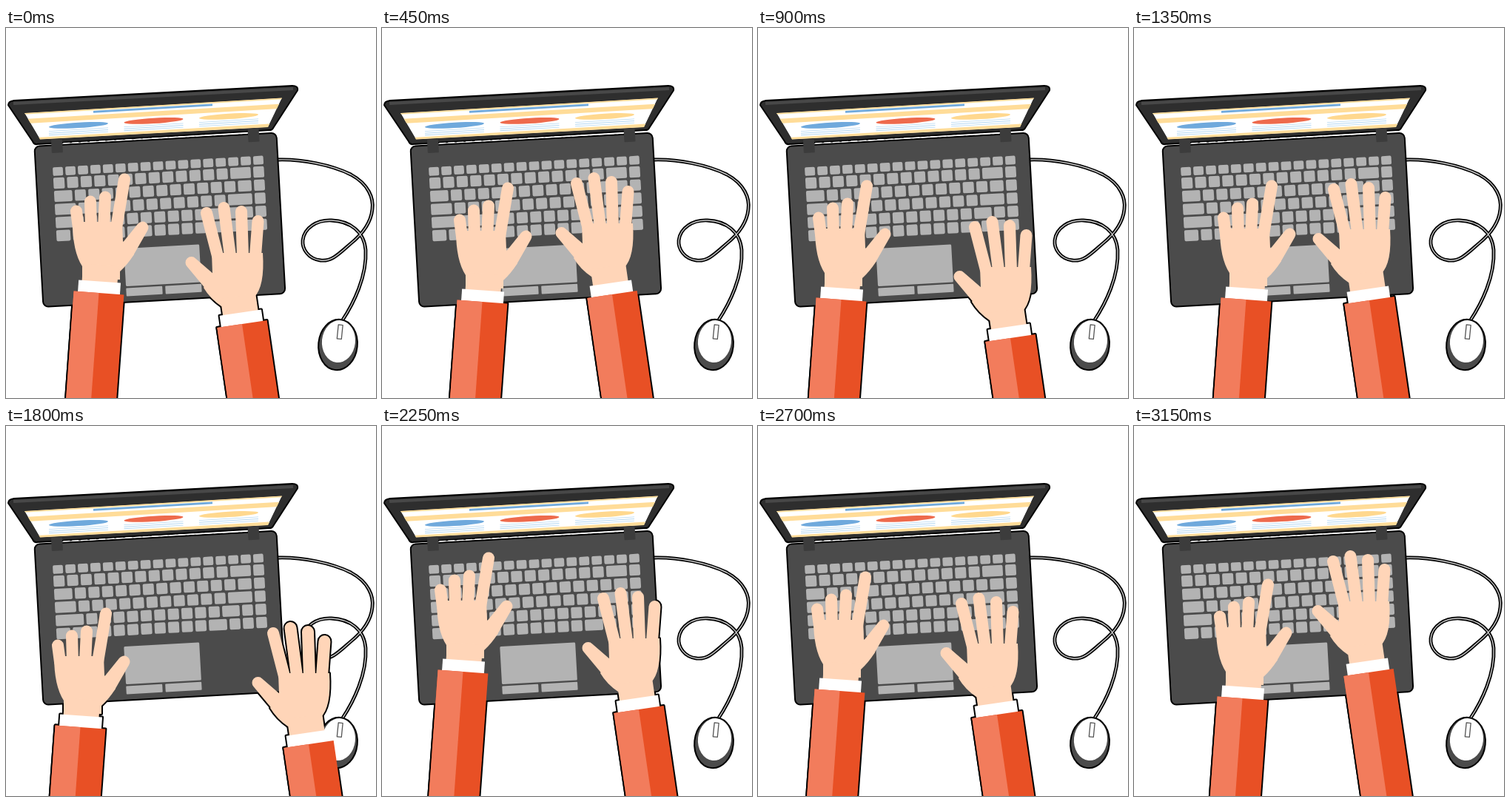
Write an HTML page with a canvas that moves like this. It is 500 by 500 pixels and loops after 3600 ms.

```html
<!DOCTYPE html>
<html lang="en">
<head>
<meta charset="utf-8">
<title>Typing hands</title>
<style>
html, body { margin: 0; width: 100%; height: 100%; overflow: hidden; background: #fff; }
canvas { display: block; width: 500px; height: 500px; }
</style>
</head>
<body>
<canvas id="stage"></canvas>
<script>
const STEP = 450, OUTLINE = 4;
const SKIN = '#ffd5b8', LIGHT = '#f27c5c', RED = '#e85025', DARK = '#4b4b4b', KEY = '#b3b3b3';

const canvas = document.getElementById('stage');
const ctx = canvas.getContext('2d');
const ratio = window.devicePixelRatio || 1;
canvas.width = canvas.height = 500 * ratio;

function fill(path, color) {
  ctx.fillStyle = color;
  ctx.fill(path);
}

function stroke(path, color = '#000', width = OUTLINE) {
  ctx.strokeStyle = color;
  ctx.lineWidth = width;
  ctx.stroke(path);
}

function outlined(path, color) {
  stroke(path);
  fill(path, color);
}

function box(x, y, w, h, r = 0) {
  const path = new Path2D();
  path.roundRect(x, y, w, h, r);
  return path;
}

function oval(x, y, rx, ry, turn = 0) {
  const path = new Path2D();
  path.ellipse(x, y, rx, ry, turn, 0, 7);
  return path;
}

function at(x, y, turn, paint) {
  ctx.save();
  ctx.translate(x, y);
  ctx.rotate(turn);
  paint();
  ctx.restore();
}

// Tapered finger from its tip to its base
function finger([x1, y1], [x2, y2], baseRadius = 8) {
  const path = new Path2D(), a = Math.atan2(y2 - y1, x2 - x1), q = Math.PI / 2;
  path.arc(x1, y1, 8, a + q, a + 3 * q);
  path.arc(x2, y2, baseRadius, a - q, a + q);
  path.closePath();
  return path;
}

// Each hand: fingertips from left to right, first knuckle, thumb, palm, sleeve and its path of moves
const HANDS = [
  {
    tips: [[95, 247.5], [114, 234.5], [134, 228.5], [160, 204.5]],
    knuckle: [98, 270],
    thumb: [[184.5, 269.5], [163, 301]],
    palm: 'M90 262H157L158 288L173 306Q164 320 154 329V340H103V322Q90 302 90 262Z',
    sleeve: [125.5, 358, .072],
    moves: [[0, 0], [10, 12], [-13, 9], [26, 9], [-25, 49], [-16, -26], [-15, 0], [21, 10]]
  },
  {
    tips: [[271, 250], [294.5, 243], [318, 248], [340.5, 261]],
    knuckle: [286, 308],
    thumb: [[250.5, 317], [277, 344]],
    palm: 'M278 304H347Q350 350 335 364V376H291Q276 366 267 351L279 332Z',
    sleeve: [319, 400, -.145],
    moves: [[0, 0], [-8, -40], [22, 19], [-1, -32], [90, 30], [28, -17], [4, -10], [-2, -67]]
  }
];

for (const hand of HANDS) {
  const [x, y] = hand.knuckle;
  hand.skin = [
    ...hand.tips.map((tip, i) => finger(tip, [x + 17 * i, y])),
    finger(...hand.thumb, 11),
    new Path2D(hand.palm)
  ];
}

function drawArm(hand, step, paint) {
  at(...hand.moves[step], 0, () => {
    hand.skin.forEach(path => paint(path, SKIN));
    at(...hand.sleeve, () => {
      paint(box(-24, -38, 48, 28), SKIN);
      paint(box(-28.5, -15.5, 57, 20), '#fff');
      paint(box(-34, 0, 68, 250), RED);
      paint(box(-34, 0, 34, 250), LIGHT);
    });
  });
}

// A row has one leading key, `count` equal keys, a stretched key and `tail` keys in the right columns
function drawKeyRow(y, lead, count, tail) {
  const key = (x, w) => fill(box(x, y, w, 15, 2), KEY);
  const pitch = 18.4, first = lead + 3.4;
  const stretched = first + count * pitch, columns = 285 - tail * 18;
  key(0, lead);
  for (let i = 0; i < count; i++) key(first + i * pitch, 15);
  key(stretched, columns - stretched);
  for (let i = 0; i < tail; i++) key(columns + 3.4 + i * 18, 14.6);
}

function drawBase() {
  outlined(box(-22, -28.5, 325.5, 215.5, 6), DARK);
  for (let i = 0; i < 17; i++) fill(box(i * 16.95, .3, 13.7, 11.7, 2), KEY);
  [[15, 12, 1], [24.5, 12, 1], [28.5, 11, 1], [38, 10, 2], [19, 10, 3]]
    .forEach((row, i) => drawKeyRow(14.5 + 17.75 * i, ...row));
  fill(box(90, 115.3, 102, 51, 1.5), KEY);
  for (const x of [90, 143]) fill(box(x, 168.7, 49, 11, 1), KEY);
}

function drawHinges() {
  ctx.setLineDash([9, 3]);
  stroke(new Path2D('M16 -31.3H265'), '#fff', 1.3);
  ctx.setLineDash([]);
  for (const x of [0, 266]) fill(box(x, -37, 15, 18, 1), '#3c3c3c');
}

const lid = new Path2D('M4 104Q4 100 11 99L387 79Q394 79 393 84L360 135Q359 137 356 137L42 156Q39 157 37 153Z');
const lidEdge = new Path2D('M10 102L388 82');
const screen = new Path2D('M25 115L373 94.5L354 134L46 150.5Z');
const cable = new Path2D('M367 178C400 177 440 185 466 198C490 211 497 230 495 245C493 265 480 280 465 292C450 305 440 316 425 314C408 312 400 298 401 287C403 270 420 259 440 260C465 261 484 275 486 300C488 335 470 372 454 396');

function drawScreen() {
  ctx.save();
  ctx.clip(screen);
  fill(screen, '#fff');
  ctx.transform(1, -.059, 0, 1, 25, 115.5);
  const band = (x, y, w, h, color) => fill(box(x, y, w, h), color);
  for (const y of [-5, 7.5, 33.5]) band(0, y, 350, 6.2, '#ffdc98');
  band(93, 2, 161, 2.8, '#6fa9dc');
  ['#6fa9dc', '#ee6a4c', '#ffd88e'].forEach((color, i) => {
    const x = 73 + i * 101.5;
    fill(oval(x, 20.2, 40, 3.7), color);
    for (let line = 0; line < 3; line++) band(x - 40, 25.6 + line * 2.6, 80, .9, '#b5d8f2');
  });
  ctx.restore();
}

function drawLaptop() {
  at(63, 188, -.0555, drawBase);
  outlined(lid, '#2e2e2e');
  stroke(lidEdge, '#484848', 4);
  drawScreen();
  at(63, 188, -.0555, drawHinges);
}

function drawMouse() {
  at(448.5, 428, .1, () => {
    outlined(oval(0, 0, 25.3, 33.3), DARK);
    fill(oval(.5, -4.5, 22.5, 28.5), '#fff');
    stroke(box(-2, -27, 6, 19), '#555', 1.3);
  });
}

function draw(time) {
  const step = Math.floor(time / STEP) % HANDS[0].moves.length;
  const drawArms = paint => HANDS.forEach(hand => drawArm(hand, step, paint));
  ctx.setTransform(ratio, 0, 0, ratio, 0, 0);
  ctx.lineJoin = 'round';
  fill(box(0, 0, 500, 500), '#fff');
  stroke(cable, '#000', 4.8);
  stroke(cable, '#ccc', 1.4);
  // Arm outlines lie below the laptop, so they show only against the white background
  drawArms(path => stroke(path));
  drawMouse();
  drawLaptop();
  drawArms(fill);
}

const start = performance.now();
function tick() {
  draw(performance.now() - start);
  requestAnimationFrame(tick);
}
tick();
</script>
</body>
</html>
```
